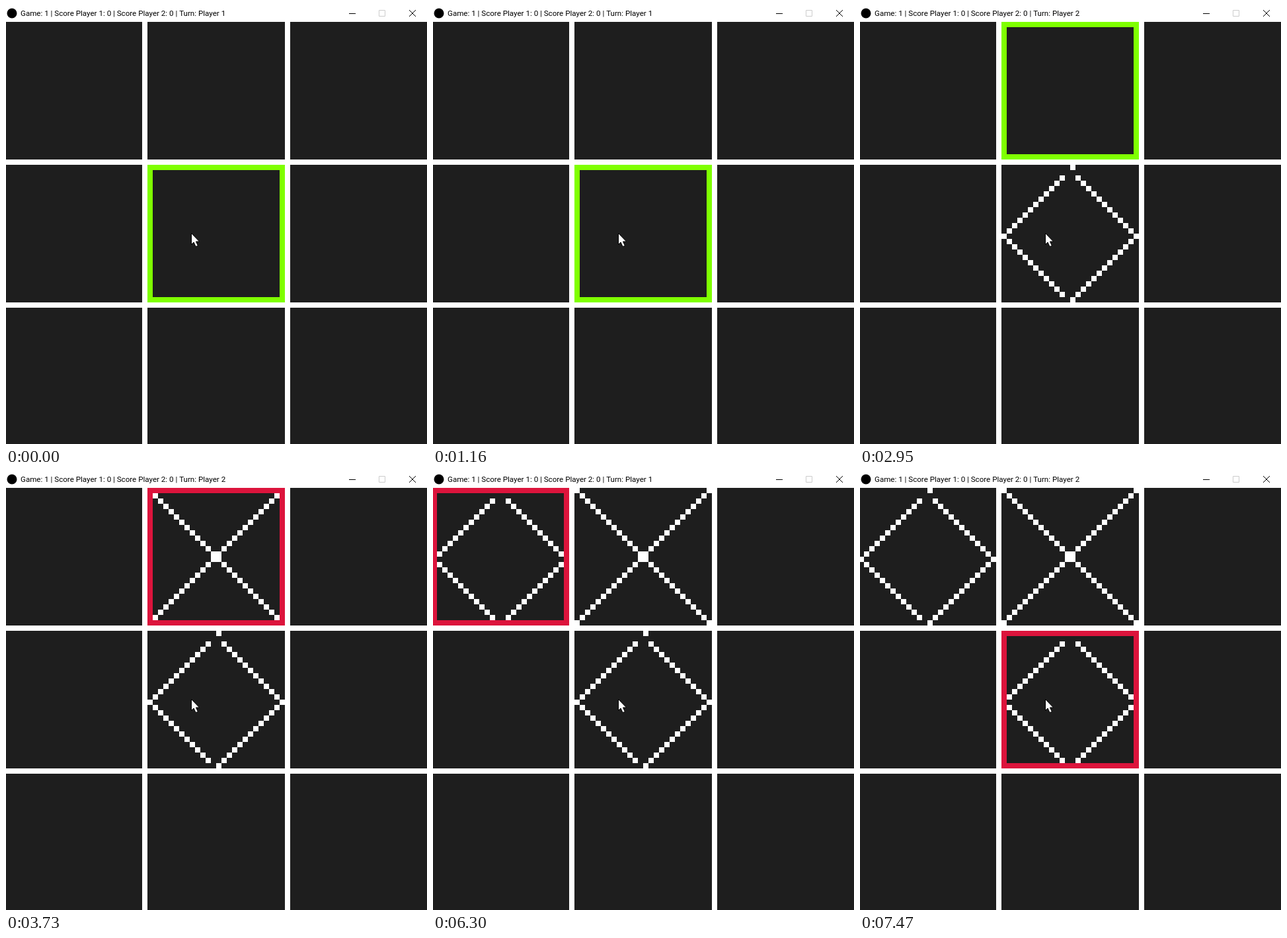
Write an HTML page with a canvas that moves like this. It is 637 px wide and 662 px high and loops after 8000 ms.

```html
<!DOCTYPE html>
<html lang="en">
<head>
<meta charset="utf-8">
<style>
html, body { margin: 0; width: 100%; height: 100%; overflow: hidden; background: #fff; }
canvas { display: block; }
</style>
</head>
<body>
<canvas width="637" height="662"></canvas>
<script>
const ctx = document.querySelector('canvas').getContext('2d');
const LOOP = 8000, BLOCK = 8, SIZE = 26, PITCH = 216;
const FREE = '#7fff00', TAKEN = '#dc143c';

// Cells are numbered 0 to 8, row by row.
const cursorMoves = [
  [0, 4, FREE], [860, 1, FREE], [1160, 4, FREE], [1710, 4, TAKEN],
  [2950, 1, FREE], [3730, 1, TAKEN], [4830, 0, FREE], [6300, 0, TAKEN],
  [7230, 3, FREE], [7470, 4, TAKEN]
];
const marks = [[1710, 4, drawO], [3730, 1, drawX], [6300, 0, drawO]];
const turns = [[0, 1], [2640, 2], [4660, 1], [6620, 2]];

const latest = (list, t) => list.filter(e => e[0] <= t).pop();
const origin = cell => [-2 + PITCH * (cell % 3), 24 + PITCH * Math.floor(cell / 3)];

function rect(x, y, w, h, color) {
  ctx.fillStyle = color;
  ctx.fillRect(x, y, w, h);
}

function block(cell, col, row) {
  const [x, y] = origin(cell);
  rect(x + col * BLOCK, y + row * BLOCK, BLOCK, BLOCK, '#fff');
}

function drawO(cell) {
  block(cell, 13, 0);
  block(cell, 13, 25);
  for (let i = 0; i < 12; i++)
    for (const col of [i, 25 - i]) {
      block(cell, col, 13 - i);
      block(cell, col, 13 + i);
    }
}

function drawX(cell) {
  for (let i = 0; i < SIZE; i++) {
    block(cell, i, i);
    block(cell, 25 - i, i);
  }
}

function stroke(path, color) {
  ctx.strokeStyle = color;
  ctx.lineWidth = 1;
  ctx.stroke(new Path2D(path));
}

function drawTitle(turn) {
  rect(0, 0, 637, 24, '#fff');
  ctx.fillStyle = '#000';
  ctx.beginPath();
  ctx.arc(9, 11, 7.5, 0, Math.PI * 2);
  ctx.fill();
  ctx.font = '11.6px Roboto, sans-serif';
  ctx.fillText(`Game: 1 | Score Player 1: 0 | Score Player 2: 0 | Turn: Player ${turn}`, 22, 15);
  stroke('M519 11.5h10M610 6l10 10M620 6l-10 10', '#000');
  stroke('M564.5 6.5h9v9h-9z', '#ccc');
}

function drawPointer() {
  const arrow = 'M280.5 343.5V360.5L284 357L287 363.5L290.5 362.5L287.5 356H292.5Z';
  ctx.fillStyle = '#fff';
  ctx.fill(new Path2D(arrow));
  stroke(arrow, '#000');
}

function draw(t) {
  rect(0, 0, 637, 662, '#fff');
  const side = BLOCK * SIZE;
  for (let cell = 0; cell < 9; cell++) rect(...origin(cell), side, side, '#1e1e1e');
  for (const [start, cell, mark] of marks) if (t >= start) mark(cell);

  const [, cell, color] = latest(cursorMoves, t);
  const [x, y] = origin(cell);
  ctx.strokeStyle = color;
  ctx.lineWidth = BLOCK;
  ctx.strokeRect(x + 4, y + 4, side - 8, side - 8);

  drawTitle(latest(turns, t)[1]);
  drawPointer();
}

const begin = performance.now();
function tick() {
  draw((performance.now() - begin) % LOOP);
  requestAnimationFrame(tick);
}
tick();
</script>
</body>
</html>
```
